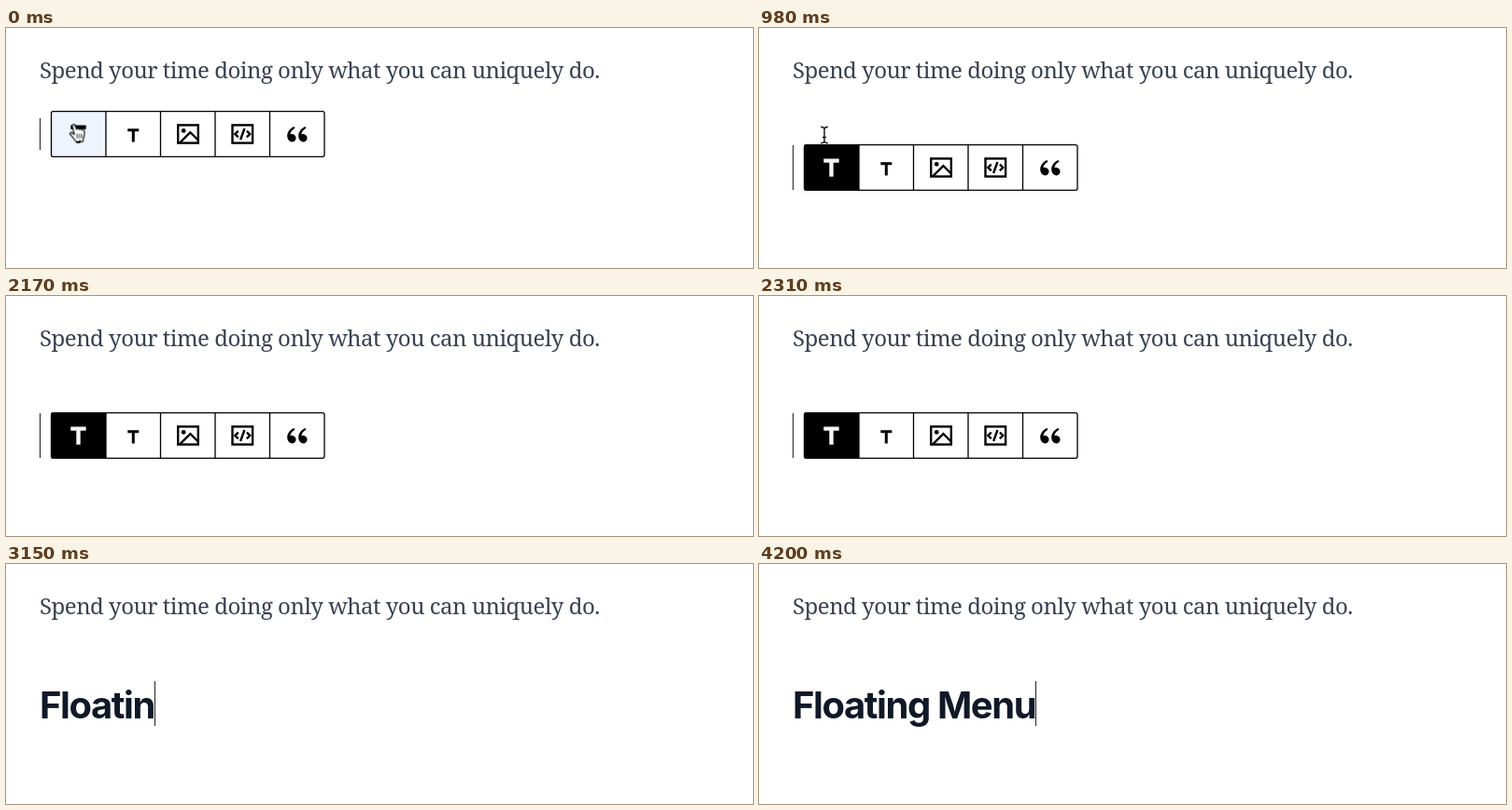
Write an HTML page that moves like this. It is 800 by 258 pixels and loops after 4270 ms.

```html
<!DOCTYPE html>
<html lang="en">
<head>
<meta charset="utf-8">
<title>Floating menu</title>
<style>
  :root { --loop: 4270ms; }
  html, body { margin: 0; width: 100%; height: 100%; overflow: hidden; background: #fff; }
  p, h1, svg { position: absolute; margin: 0; white-space: pre; }
  p {
    left: 36px; top: 27px;
    font: 24px/36px "Noto Serif", serif;
    letter-spacing: -.5px;
    color: #374151;
  }
  h1 {
    display: flex; align-items: flex-start;
    left: 36px; top: 126px; height: 48px;
    font: 700 40px/48px Inter, sans-serif;
    letter-spacing: -1.4px;
    color: #111827;
  }
  #typed { position: relative; top: 2px; }
  #caret { width: 1.3px; height: 48px; background: #222; animation: caret var(--loop) step-end infinite; }
  svg { left: 0; top: 0; }
  #menu { animation: menu var(--loop) step-end infinite; }
  #cell { fill: #eff3fc; animation: cell var(--loop) step-end infinite; }
  #big { animation: big var(--loop) step-end infinite; }
  #hand { animation: move var(--loop) infinite, hand var(--loop) step-end infinite; }
  #beam { animation: beam var(--loop) step-end infinite; }

  /* 490, 980, 1470, 2030, 2100 and 2380 ms */
  @keyframes caret {
    0% { opacity: 1; margin-top: -29px; height: 34px; }
    11.475% { opacity: 0; margin-top: -29px; height: 34px; }
    22.951% { opacity: 1; margin-top: 0; height: 48px; }
    34.426% { opacity: 0; margin-top: 0; height: 48px; }
    47.541%, 100% { opacity: 1; margin-top: 0; height: 48px; }
  }
  @keyframes menu {
    0% { transform: none; opacity: 1; }
    22.951% { transform: translateY(36px); opacity: 1; }
    55.738%, 100% { transform: translateY(36px); opacity: 0; }
  }
  @keyframes cell { 0% { fill: #eff3fc; } 22.951%, 100% { fill: #000; } }
  @keyframes big { 0% { fill: #000; } 22.951%, 100% { fill: #f3f4f6; } }
  @keyframes move {
    0% { transform: translate(4.5px, -11.5px); animation-timing-function: steps(4, end); }
    6.557%, 100% { transform: none; }
  }
  @keyframes hand { 0% { opacity: 1; } 22.951%, 100% { opacity: 0; } }
  @keyframes beam { 0% { opacity: 0; } 22.951% { opacity: 1; } 49.18%, 100% { opacity: 0; } }
</style>
</head>
<body>
<p>Spend your time doing only what you can uniquely do.</p>
<h1><span id="typed"></span><i id="caret"></i></h1>
<svg width="800" height="258" viewBox="0 0 800 258">
  <g id="menu">
    <rect x="48.5" y="89.7" width="292.5" height="48.6" rx="2" fill="#fff"/>
    <path id="cell" d="M48.5 89.7H107V138.3H48.5Z"/>
    <g fill="none" stroke="#000" stroke-width="1.3">
      <rect x="48.5" y="89.7" width="292.5" height="48.6" rx="2"/>
      <path d="M107 90v48M165.5 90v48M224 90v48M282.5 90v48"/>
    </g>
    <path id="big" d="M69.3 104.5h16.4v4.2h-6v15h-4.4v-15h-6z"/>
    <path d="M130.3 108.3h12v2.9h-4.5v11.2h-3v-11.2h-4.5z"/>
    <g fill="none" stroke="#000" stroke-width="2">
      <g transform="translate(180.6 99.6) scale(1.2)">
        <rect x="3" y="4" width="18" height="16"/>
        <path d="M4.5 19.9L14 10.4l6.8 6.8"/>
        <circle cx="8" cy="9" r="2" fill="#000" stroke="none"/>
      </g>
      <g transform="translate(238.9 99.6) scale(1.2)">
        <rect x="3" y="4" width="18" height="16"/>
        <path d="M8.2 9.2L5.4 12l2.8 2.8M15.8 9.2l2.8 2.8-2.8 2.8M13.8 7l-3.6 10"/>
      </g>
    </g>
    <g transform="translate(297.6 100.2) scale(1.2)">
      <path id="quote" d="M4.6 17.3C3.6 16.2 3 15 3 13c0-3.5 2.5-6.6 6-8.2l.9 1.4c-3.3 1.8-4 4.1-4.2 5.6.5-.3 1.2-.4 1.9-.3 1.8.2 3.2 1.7 3.2 3.5a3.5 3.5 0 0 1-3.5 3.5c-1 0-2.1-.5-2.7-1.2z"/>
      <use href="#quote" x="10"/>
    </g>
  </g>
  <g id="hand" fill="#fff" stroke="#000" stroke-width="1.1" stroke-linejoin="round" stroke-linecap="round">
    <path d="M66.6 117.2c-.7-2 2.1-3 2.9-1l1.6 4.4c.3-1.5 2.6-1.5 3 .2.5-1.1 2.5-1 2.8.5.8-.9 2.5-.4 2.6 1.1.2 3.4.1 5.5-1.2 7.7l-.4 3.7h-2.1l-.9-1.2-1.2 1.2h-3.4c-.8-2.5-3.5-4.9-5.7-7.6-1.3-1.6.4-3 2-1.9l2.1 1.7z"/>
    <path d="M71.6 125.5v4.2M74 125.5v4.2M76.4 125.5v4.2" fill="none" stroke-width=".8"/>
  </g>
  <path id="beam" d="M66.2 106.2q3.2 0 3.8 2.2q.6-2.2 3.8-2.2M70 108.4v13.2M66.2 123.8q3.2 0 3.8-2.2q.6 2.2 3.8 2.2M68 117.5h4" fill="none" stroke="#111" stroke-width="1.4"/>
</svg>
<script>
  const LOOP = 4270, TEXT = "Floating Menu";
  const keys = [2380, 2520, 2590, 2800, 2870, 3010, 3080, 3220, 3430, 3570, 3780, 3920, 4060];
  const typed = document.getElementById("typed");
  const clock = document.getElementById("caret").getAnimations()[0];

  function draw(now) {
    const t = (clock?.currentTime ?? now) % LOOP;
    const text = TEXT.slice(0, keys.filter(k => k <= t).length);
    if (typed.textContent !== text) typed.textContent = text;
    requestAnimationFrame(draw);
  }
  requestAnimationFrame(draw);
</script>
</body>
</html>
```
